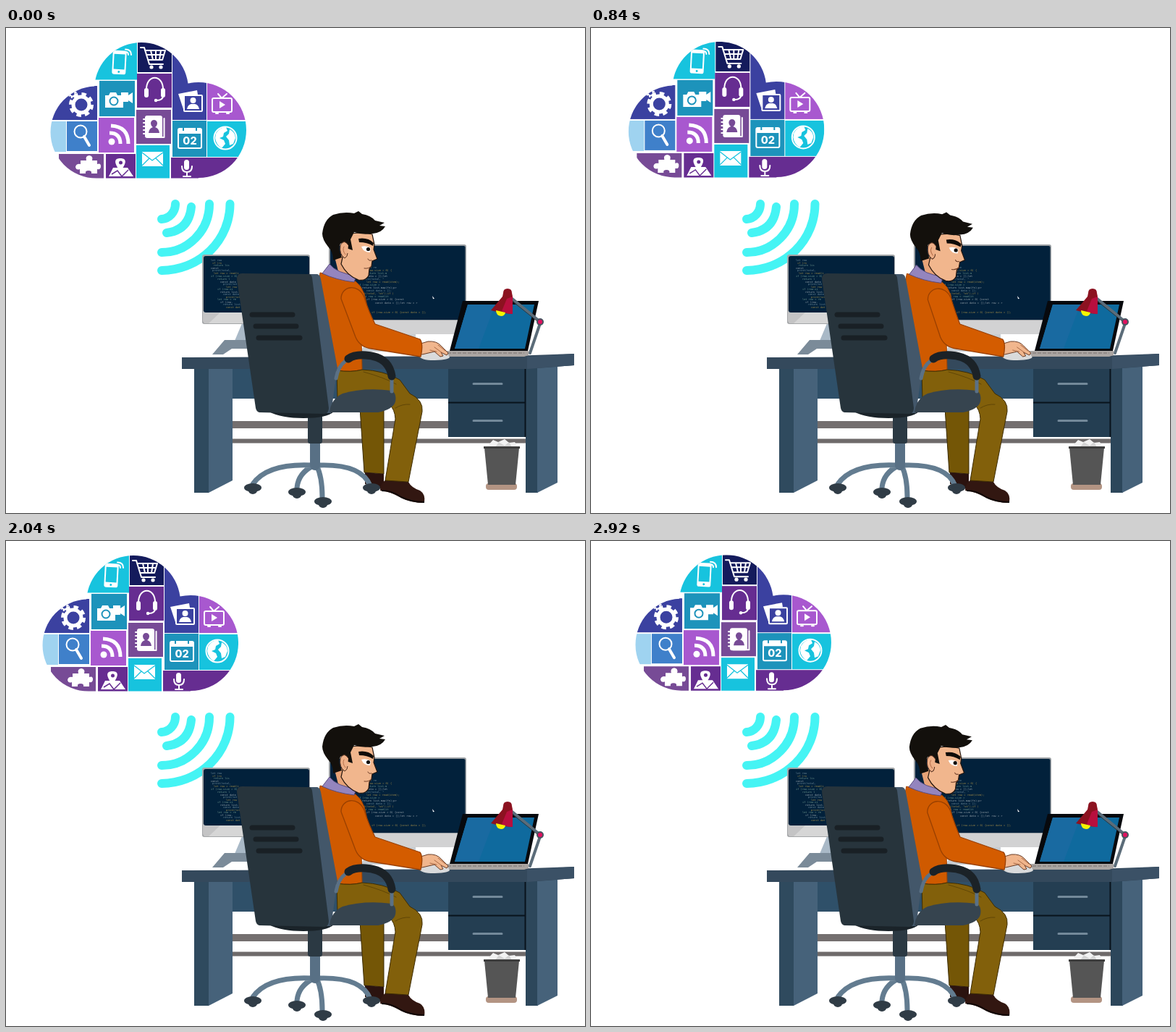
Recreate the animation shown at these times as an HTML page. Size 800x670 px, loop 2960 ms.

```html
<!DOCTYPE html>
<html lang="en">
<head>
<meta charset="utf-8">
<title>Developer at desk</title>
<style>
html, body { margin: 0; width: 100%; height: 100%; overflow: hidden; background: #fff; }
svg { display: block; width: 800px; height: 670px; }
.ln { fill: none; stroke-linecap: round; stroke-linejoin: round; }
.code { font: 3.6px "DejaVu Sans Mono", monospace; }
.ic { fill: #fff; stroke: none; }
.io { fill: none; stroke: #fff; stroke-width: 2; stroke-linejoin: round; stroke-linecap: round; }
</style>
</head>
<body>
<svg viewBox="0 0 800 670">
<defs>
  <clipPath id="cloudShape">
    <circle cx="187" cy="85" r="65"/><circle cx="125" cy="144" r="63.5"/>
    <circle cx="266" cy="141" r="66"/><rect x="125" y="85" width="141" height="122.5"/>
  </clipPath>
</defs>

<g id="cloud" clip-path="url(#cloudShape)">
  <g id="tiles"></g>
  <!-- phone, cart -->
  <g transform="rotate(3 156 48)">
    <rect class="ic" x="147" y="31" width="19" height="33" rx="3"/>
    <rect x="149" y="36" width="15" height="21" fill="#17c3de"/><circle cx="156.500" cy="60.500" r="1.500" fill="#17c3de"/>
  </g>
  <path class="io" d="M165 33q4 0 4 4M165 29.500q8 0 8 7.500"/>
  <path class="io" d="M186 27h5l7 23h19M192 31h28l-4 13h-20M194 37h24M200 31l3 13M207 31v13M214 31l-2 13"/>
  <circle class="ic" cx="201" cy="54" r="2.600"/><circle class="ic" cx="214" cy="54" r="2.600"/>
  <!-- headset, camera -->
  <path class="io" d="M194 86c-1-23 24-23 23 0M217 93c0 5-4 7-9 7"/>
  <rect class="ic" x="191" y="83" width="6" height="13" rx="3"/><rect class="ic" x="214" y="83" width="6" height="13" rx="3"/>
  <circle class="ic" cx="207" cy="100" r="2.200"/>
  <path class="ic" d="M137 93h5l2-4h8l2 4h8v17h-25zM159 89h10v4l6-4v15l-6-4v2h-10z"/>
  <circle cx="149" cy="101" r="5.500" fill="#fff" stroke="#1d93bb" stroke-width="2"/>
  <!-- photos, tv -->
  <path class="ic" d="M238 91l26-5 1 6-19 1-1 19z"/>
  <rect x="246" y="93" width="25" height="22" rx="1" fill="#3b41a0" stroke="#fff" stroke-width="2"/>
  <circle class="ic" cx="258.500" cy="100" r="4"/><path class="ic" d="M250 112q1-6 6-7h5q5 1 6 7z"/>
  <rect class="io" x="285" y="97" width="27" height="19" rx="2"/>
  <path class="io" d="M293 91l5 6 7-6M290 118h3M305 118h3" stroke-width="1.500"/><path class="ic" d="M295 101l8 5-8 5z"/>
  <!-- gears, magnifier -->
  <g fill="none" stroke="#fff">
    <circle cx="104" cy="106" r="11" stroke-width="5"/><circle cx="104" cy="106" r="14.500" stroke-width="5" stroke-dasharray="6.300 5.090"/>
    <circle cx="92" cy="91" r="3.500" stroke-width="2"/><circle cx="92" cy="91" r="5" stroke-width="2" stroke-dasharray="2 1.930"/>
    <circle cx="103" cy="143" r="8.500" stroke-width="2"/><path d="M108 150l7 12" stroke-width="4" stroke-linecap="round"/>
  </g>
  <!-- feed, address book -->
  <circle class="ic" cx="146" cy="157" r="4.500"/>
  <path d="M143 145q15 0 15 15M145 135q24 1 24 25" fill="none" stroke="#fff" stroke-width="5"/>
  <rect class="ic" x="192" y="121" width="24" height="31" rx="3"/><path class="io" d="M190 126h3M190 131h3M190 136h3M190 141h3M190 146h3M218.500 125v26h-22"/>
  <path d="M195 124h18v25h-18z" fill="#fff"/>
  <path d="M197 145q1-7 6-8-3-2-3-6 1-4 4.500-4t4.500 4q0 4-3 6 5 1 6 8z" fill="#774b96"/>
  <!-- calendar, globe -->
  <rect class="io" x="238" y="139" width="32" height="27" rx="2"/><path class="ic" d="M238 139h32v7h-32z"/>
  <path d="M245 137v5M263 137v5" stroke="#1d93bb" stroke-width="2"/>
  <text x="254" y="161" text-anchor="middle" fill="#fff" font-family="Inter, Arial, sans-serif" font-weight="800" font-size="14.500">02</text>
  <circle class="io" cx="303" cy="152" r="15.500"/>
  <path class="ic" d="M290 146q5-9 14-9l2 5-5 3-1 5-5 2 6 3 2 5-5 6q-8-5-9-14zM309 140q8 4 8 12l-3 8-5 2-1-7-4-5 4-4z"/>
  <!-- puzzle, map, mail, microphone -->
  <path class="ic" d="M103 183h8q-2-6 4-7 6 1 4 7h7v5q5-2 5 3t-5 4v6h-8q1-4-4-4t-4 4h-8v-6q-5 2-6-3 1-5 7-4z"/>
  <path class="ic" d="M148 193h20l8 12h-34zM158 198c-11-14-7-18 0-18s11 4 0 18z"/><circle cx="158.500" cy="186" r="2.500" fill="#662d91"/>
  <path d="M146 202l8-5 6 8 9-9" fill="none" stroke="#662d91" stroke-width="1.500"/>
  <path class="ic" d="M188 171h29v20h-29z"/><path d="M188 172l14 11 15-11M188 190l10-10M217 190l-10-10" fill="none" stroke="#17c3de" stroke-width="1.300"/>
  <rect class="ic" x="246" y="182" width="7" height="14" rx="3.500"/><path class="io" d="M243 191q0 8 7 8t7-8M250 199v6M245 205h10" stroke-width="1.700"/>
</g>

<path class="ln" stroke="#45f4f4" stroke-width="12" d="M234 243a20 21 0 0 1-19 21M256 247q-3 32-34 36M281 243a66 67 0 0 1-66 67M309.500 243a95 92 0 0 1-94.500 92"/>

<!-- left monitor -->
<path d="M327 406h22l-9 32-24-6z" fill="#a9b9c7"/>
<path d="M302 431h32v12h-22l-12 8h-15z" fill="#7b8b99"/>
<rect x="271" y="313" width="149" height="96" rx="3" fill="#a4a6a8"/>
<path d="M272 391h148v15l-3 2H274l-2-3z" fill="#c4c4c5"/><path d="M298 391h122v17H280z" fill="#d6d6d6"/>
<rect x="273" y="315" width="146" height="78" rx="3" fill="#02213b"/>
<!-- right monitor -->
<path d="M506 420h60v27h-76z" fill="#c8cdd2"/>
<path d="M447 402h189v17q0 4-4 4H447z" fill="#d2d2d3"/>
<rect x="446" y="299" width="190" height="105" rx="3" fill="#9b9fa3"/>
<rect x="448" y="301" width="186.500" height="102" rx="2" fill="#02213b"/>
<path d="M589 370l3 4-2 .3z" fill="#fff"/>
<g id="code" class="code"></g>

<!-- desk -->
<path d="M293 548h318" class="ln" stroke="#746f6f" stroke-width="10"/><path d="M293 570.500h424" class="ln" stroke="#6e6a6a" stroke-width="6"/>
<path d="M313 471h299v41H313z" fill="#2f5069"/>
<path d="M260 470h20v172h-20z" fill="#2f4a5e"/><path d="M280 470h33v155l-33 17z" fill="#46627a"/>
<path d="M718 468h17v174h-17z" fill="#2d475b"/><path d="M734 468h28v160l-28 14z" fill="#46627a"/>
<path d="M611 470h107v95H611z" fill="#243e52"/><path d="M611 517.500h107M717.500 471v94" stroke="#08131c" stroke-width="2"/>
<path d="M646 491.500h39M646 542.500h39" class="ln" stroke="#73899a" stroke-width="3"/>
<path d="M243 455l457-2 85-3v16l-64 5H243z" fill="#34495c"/><path d="M720 454l65-4v16l-65 5z" fill="#3b5166"/>

<!-- bin -->
<path d="M664 579l9-10 7 3 9-4 6 5 8-1 4 7z" fill="#f2f2f2"/><path d="M676 579l5-7 8 5 6-5 4 7z" fill="#d5d5d5"/>
<rect x="663" y="629" width="43" height="9" rx="4" fill="#b39483"/>
<path d="M661 580h48l-5 51h-38z" fill="#555"/><path d="M660 579.500h50" stroke="#3d3d3d" stroke-width="3"/>

<!-- laptop -->
<path d="M602 446h120v6l-6 2H598z" fill="#aaa5a2"/><path d="M610 449h106" stroke="#918a87" stroke-width="2" stroke-dasharray="5 2"/>
<path d="M631 377h105l-15 69H613z" fill="#07090d"/>
<path d="M638 382h92l-13 61h-97z" fill="#0f6a9e"/><path d="M638 382h38l-23 61h-33z" fill="#196aa1"/>
<!-- lamp -->
<g class="ln">
  <path d="M697 372l40 33M738 408l-14 41" stroke="#5b6c79" stroke-width="4"/>
  <path d="M699 377l35 28" stroke="#30383f" stroke-width="1"/>
</g>
<path d="M687 366q0-6 6-6t6 6l1 5-1 24q-16-1-29-5l16-19z" fill="#8c1220"/><path d="M692 374l8-3v24q-9 0-15-4z" fill="#b80f3e"/>
<path d="M677 390l13 3q-1 5-6 5-7-1-7-8z" fill="#f5f500"/>
<circle cx="738" cy="406" r="5" fill="#47545f"/><circle cx="738" cy="406" r="3" fill="#e0115f"/>

<!-- far leg, shoes -->
<path d="M489 525h33v91l-27-2z" fill="#745606" stroke="#392a04"/>
<path d="M496 614l26 2v22l-26-8z" fill="#2b130f"/>
<path d="M525 624l31 3q4 8 16 12 8 5 6 17-22-1-34-8-14-8-27-9 0-10 8-15z" fill="#321711"/><path d="M519 639q14 0 27 9 14 7 32 7" fill="none" stroke="#120705" stroke-width="2"/>

<path id="torso" fill="#cf5a00" stroke="#a54500" stroke-width="1"/>
<g id="neck">
  <path d="M453 312l34 8 1 25-28-5z" fill="#e7a377"/>
  <path d="M447 326q10 13 37 16l-3 9q-25-3-44-12z" fill="#9485be" stroke="#5a4c80"/>
</g>
<g id="head">
  <path d="M472 285q18-4 34 0l3 14-1 7 5 13-7 3-1 7-3 4-1 9q-4 8-14 6-16-6-24-22z" fill="#f1b68d" stroke="#23150e" stroke-width="1.200"/>
  <path d="M437 284q2-19 15-26 15-5 29-2l6-3 5 4q12 2 18 9l13 3-7 4 8 1q-5 9-18 10-14 2-25-2l-5 10 3 15-9-3q-3-9-8-6-4 6 2 19l-12 4q0-12-7-19-8-10-8-18z" fill="#13100c"/>
  <path d="M473 300q-6-9-11 0-2 13 6 18 4-2 4-7" fill="#eeb088" stroke="#54301f"/>
  <path d="M467 302q-3 5 2 11" class="ln" stroke="#b7714c"/>
  <path d="M487 291q13-2 21 6l-1 4q-8-5-19-5z" fill="#100c09"/>
  <g id="eye"><path d="M491 302q7-2 13 2l-1 6q-9 0-12-8z" fill="#fff"/><circle cx="500.500" cy="305.500" r="2.600" fill="#100c09"/></g>
  <path id="lid" class="ln" d="M491 303q8-2 15 2" stroke="#9c6143" stroke-width="1.200"/>
  <path class="ln" d="M495 332q6 1 10-3M505 321q-4 1-5-2" stroke="#6a3a25"/>
</g>

<!-- chair -->
<g class="ln">
  <path d="M423 604Q361 601 341 630M424 605q-20 10-22 30M429 604q8 16 8 44M432 604q59-2 71 28" stroke="#637c90" stroke-width="7"/>
  <path d="M427 572v32" stroke="#587085" stroke-width="14"/>
</g>
<rect x="417" y="535" width="20" height="39" rx="3" fill="#2b3943"/>
<g id="casters" fill="#303c46"></g>
<path d="M363 530h90q-10 9-42 9-30 0-48-9z" fill="#1a2329"/>
<path d="M418 340h12q4 1 5 7l23 123-9 62h-10z" fill="#43576a"/>
<path d="M326 339l92 1q4 0 5 5l23 180q0 7-6 8l-90-2q-4-1-5-6L319 347q0-8 7-8z" fill="#27343c"/>
<path d="M340 396h56M345 412h56M349 428h57" class="ln" stroke="#192025" stroke-width="7"/>

<!-- near leg -->
<path d="M457 473q20 3 35-1 30 1 52 14l14 19q19 9 17 25l-19 97-32-2 14-85q-1-14-8-19l-72-8z" fill="#82600b" stroke="#3d2c04"/>
<path d="M494 475q29 8 45 17M538 525q10-6 20-5" class="ln" stroke="#604606"/>
<path d="M447 531q2-19 18-26 30-9 68-4 7 4 5 15-3 11-24 15z" fill="#36444f"/>
<path d="M533 484v18M469 460q-10 7-13 24" class="ln" stroke="#5b7186" stroke-width="5"/>

<g id="hand">
  <path d="M571 451q7-8 23-6 16 1 19 10-3 4-26 4-17-1-16-8z" fill="#d9dadb"/>
  <path d="M573 436l10-3q12-1 18 6l10 10-2 3-8-4 3 5-4 1-8-7-17 4-4-1z" fill="#f1b68d" stroke="#6a3c25"/>
  <path d="M592 441l11 8M586 445l9 2M597 438l10 8" class="ln" stroke="#a96946"/>
</g>
<path id="arm" fill="#d45c00" stroke="#9a4000" stroke-width="1.300" stroke-linejoin="round"/>
<path d="M473 457q8-6 24-5 32 2 36 29" class="ln" stroke="#1b2227" stroke-width="11"/>
</svg>

<script>
const $ = id => document.getElementById(id);
const LOOP = 2960, STEP = 40, SWAY = 2040;

function add(parent, tag, attrs, text) {
  const el = document.createElementNS($('cloud').namespaceURI, tag);
  for (const k in attrs) el.setAttribute(k, attrs[k]);
  if (text) el.textContent = text;
  $(parent).append(el);
}

// colour, left, top, right, bottom
[
  ['#17c3de', 120, 18, 181, 71.5], ['#141b5c', 182, 18, 229, 61],
  ['#3b41a0', 230, 18, 277, 127], ['#a858cf', 278, 70, 334, 127],
  ['#3b41a0', 60, 80, 126, 127], ['#1d93bb', 129, 73, 178, 122],
  ['#662d91', 181, 63, 229, 110], ['#774b96', 180, 113, 228, 160],
  ['#9fd3f0', 60, 129, 83, 171], ['#3f80ca', 84, 129, 126, 170],
  ['#a858cf', 128, 124, 177, 172], ['#1d93bb', 230, 128, 277, 178],
  ['#17c3de', 278, 129, 334, 178], ['#774b96', 73, 174, 135, 209],
  ['#662d91', 138, 174, 179, 209], ['#17c3de', 180, 162, 226, 209],
  ['#662d91', 228, 179, 334, 209]
].forEach(([fill, x, y, r, b]) => add('tiles', 'rect', { x, y, width: r - x, height: b - y, fill }));

[[341, 635], [402, 641], [438, 654], [505, 635]].forEach(([cx, cy]) => {
  add('casters', 'ellipse', { cx, cy, rx: 12, ry: 6 });
  add('casters', 'ellipse', { cx, cy: cy + 4, rx: 6, ry: 5 });
});

const words = ['let row = read(item);', 'if (row.size > 0) {', 'return list.map(fn);', 'const data = [];', 'print(total, "ok");'];
const inks = ['#6d8a99', '#9c8848', '#6b938b', '#98a3ab'];
const line = (x, y, i, n) => add('code', 'text', { x, y, fill: inks[i % 4] }, (words[i % 5] + words[(i + 2) % 5]).slice(0, n));
for (let i = 0; i < 7; i++) line(283 + (i % 3) * 2, 322 + i * 3.6, i, [8, 6, 10, 5, 12, 16, 18][i]);
for (let i = 0; i < 12; i++) line(292 + (i % 4) * 4, 348 + i * 3.5, i + 2, 8 + (i * 5) % 9);
for (let i = 0; i < 12; i++) line(486 + (i % 3) * 6, 332 + i * 4, i, 12 + (i * 7) % 13);
line(510, 381, 3, 27);
line(505, 393.5, 1, 36);

// Periodic smooth curve through [time, value] points
function curve(points, t) {
  const n = points.length;
  const at = i => {
    const turn = Math.floor(i / n), [x, y] = points[i - turn * n];
    return [x + turn * SWAY, y];
  };
  t %= SWAY;
  let i = n - 1;
  while (at(i)[0] > t) i--;
  const [p, a, b, q] = [-1, 0, 1, 2].map(k => at(i + k));
  const d = b[0] - a[0], u = (t - a[0]) / d;
  const ma = (b[1] - p[1]) / (b[0] - p[0]) * d, mb = (q[1] - a[1]) / (q[0] - a[0]) * d;
  const c = b[1] - a[1];
  return a[1] + u * (ma + u * (3 * c - 2 * ma - mb + u * (ma + mb - 2 * c)));
}

const leanKeys = [[0, 0], [540, 9.4], [880, 2.5], [1200, -4], [1560, -6.2]];
const reachKeys = [[0, 0], [540, -11.2], [880, -2], [1200, 9], [1640, 4]];
const move = (id, x, y, more = '') => $(id).setAttribute('transform', `translate(${x} ${y}) ${more}`);

function draw(t) {
  const h = curve(leanKeys, t), g = curve(reachKeys, t);
  move('cloud', -8 * (1 - Math.cos(2 * Math.PI * t / LOOP)), -0.32 * h);
  move('head', h, 0.35 * h, `rotate(${0.15 * h} 465 335)`);
  move('neck', 0.8 * h, 0.4 * h);
  move('hand', g, 0);

  const s = 0.7 * h, v = 0.4 * h, e = 0.6 * g + 0.5 * h;
  $('torso').setAttribute('d',
    `M${434 + s} ${338 + v}L${483 + s} ${350 + v}Q${499 + s} ${362 + v} 499 395L491 430L492 472Q475 476 458 473L425 400Z`);
  $('arm').setAttribute('d',
    `M${463 + s} ${374 + v}C${463 + s} ${356 + v} ${487 + s} ${352 + v} ${495 + s} ${372 + v}` +
    `Q${502 + s} ${394 + v} ${510 + e} 409L${572 + g} 430Q${577 + g} 437 ${573 + g} 454` +
    `L${505 + e} 443Q${489 + e} 441 ${483 + e} 427Z`);

  const blink = t >= 1600 && t < 1720;
  $('eye').style.display = blink ? 'none' : '';
  $('lid').style.display = blink ? '' : 'none';
}

function tick() {
  draw(Math.floor(performance.now() % LOOP / STEP) * STEP);
  requestAnimationFrame(tick);
}
tick();
</script>
</body>
</html>
```
